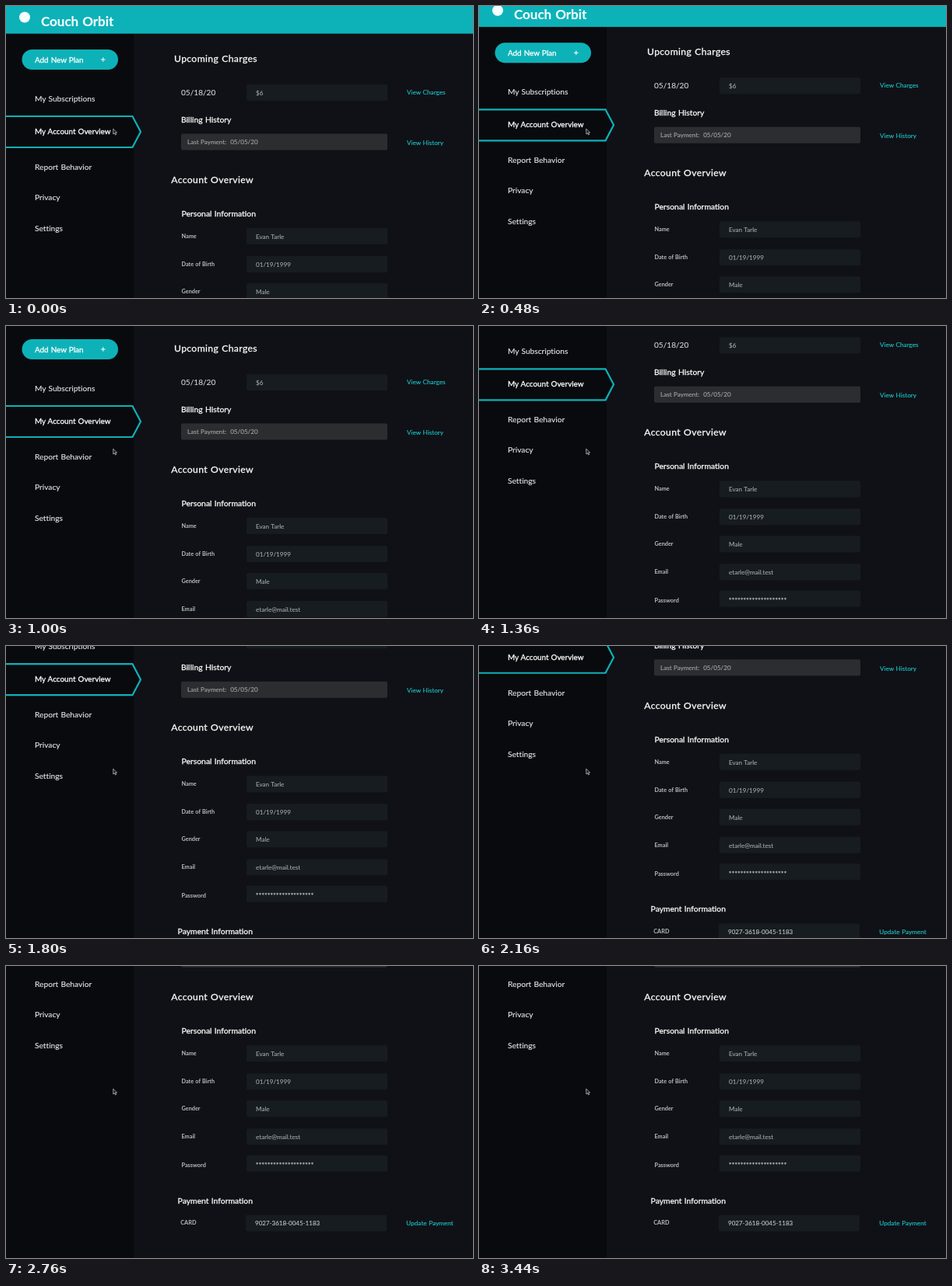
These frames come from a looping animation (600 px wide and 376 px high, 3520 ms). An HTML page:

```html
<!DOCTYPE html>
<html lang="en">
<head>
<meta charset="utf-8">
<title>Account overview</title>
<style>
  html, body { margin: 0; width: 100%; height: 100%; overflow: hidden; background: #101116; }
  svg { display: block; }
  text {
    font: 8.1px Lato, "Open Sans", sans-serif; font-variant-ligatures: none;
    white-space: pre; word-spacing: .05em;
    color: #a3a5a8; fill: currentColor; stroke: currentColor; stroke-width: .12px;
  }
  .brand { font-size: 17px; font-weight: 700; color: #f4ffff; }
  .nav { font-size: 10.2px; color: #e8e9ea; }
  .active { font-size: 9.9px; color: #fff; stroke-width: .3px; }
  .title { font-size: 12.2px; letter-spacing: .35px; color: #fafafa; stroke-width: .3px; }
  .sub { font-size: 10.4px; color: #fafafa; stroke-width: .3px; }
  .date { font-size: 10.1px; color: #d2d3d5; }
  .label { font-size: 7.3px; font-weight: 700; color: #b9bbbe; stroke: none; }
  .card { font-size: 8px; color: #c3c5c7; }
  .link { font-size: 8.2px; color: #1ab8bd; stroke-width: .2px; }
  .secret { letter-spacing: .28px; stroke-width: .35px; }
</style>
</head>
<body>
<svg width="600" height="376" viewBox="0 0 600 376">
  <rect width="600" height="376" fill="#101116"/>
  <rect width="164" height="376" fill="#090a0e"/>
  <g id="page"></g>
  <path d="M137.8 158.2v6.7l1.6-1.4 1.1 2.5 1.1-.5-1.1-2.4h2.1z" fill="#111" stroke="#d8d8d8" stroke-width=".7"/>
</svg>
<script>
const TEAL = '#0db2b8';
const LOOP = 3520, STEP = 40;
const page = document.getElementById('page');

function add(tag, attrs, content = '') {
  const node = document.createElementNS('http://www.w3.org/2000/svg', tag);
  for (const name in attrs) node.setAttribute(name, attrs[name]);
  node.textContent = content;
  page.append(node);
}
const text = (kind, x, y, content) => add('text', { class: kind, x, y }, content);
const box = (x, y, width, height, fill, rx = 0) => add('rect', { x, y, width, height, fill, rx });
const field = (y, x = 309) => box(x, y, 181, 21, '#161c20', 2);

// Header and sidebar
box(0, 0, 600, 35.6, TEAL);
add('circle', { cx: 24, cy: 14.5, r: 7, fill: '#f4ffff' });
text('brand', 45, 25.5, 'Couch Orbit');
box(20.5, 56, 123.5, 26, TEAL, 13);
text('active', 37, 72.7, 'Add New Plan');
add('path', { d: 'M122 69h5.6M124.8 66.2v5.6', stroke: '#fff', 'stroke-width': 1 });
add('path', { d: 'M-4 142H162.500L173 162 162.500 182H-4', fill: '#090a0e', stroke: TEAL, 'stroke-width': 2.2 });
text('active', 37, 164.8, 'My Account Overview');
[['My Subscriptions', 122.9], ['Report Behavior', 210.8], ['Privacy', 250.2], ['Settings', 290.1]]
  .forEach(([name, y]) => text('nav', 37, y, name));

// Charges
text('title', 216, 71.5, 'Upcoming Charges');
text('date', 225, 114.8, '05/18/20');
field(101);
text('value', 321, 114.7, '$6');
text('link', 515, 114.1, 'View Charges');
text('sub', 225, 150, 'Billing History');
box(225, 164.5, 265, 21, '#2c2d31', 2);
text('value', 233, 178.2, 'Last Payment:  05/05/20');
text('link', 515, 179.2, 'View History');

// Personal and payment details
text('title', 212.3, 228.1, 'Account Overview');
text('sub', 225.5, 271, 'Personal Information');
[['Name', 'Evan Tarle', 286], ['Date of Birth', '01/19/1999', 322], ['Gender', 'Male', 357],
 ['Email', 'etarle@mail.test', 393]].forEach(([label, value, y]) => {
  field(y);
  text('label', 225.5, y + 13.1, label);
  text('value', 321, y + 14.1, value);
});
field(427.5);
text('label', 225.5, 443.1, 'Password');
text('value secret', 321, 443, '*'.repeat(20));
text('sub', 220.6, 489.4, 'Payment Information');
field(504.5, 308);
text('label', 224.3, 517.1, 'CARD');
text('card', 320, 517.9, '9027-3618-0045-1183');
text('link', 514.3, 517.9, 'Update Payment');

// Scroll flicks as [ms, offset], joined by a monotone cubic
const keys = [[160, 0], [480, 8.7], [840, 36.5], [1000, 39], [1120, 40], [1360, 86.7],
  [1800, 118.8], [1840, 119], [2440, 175.2], [2760, 183.7]];
const slope = i => (keys[i + 1][1] - keys[i][1]) / (keys[i + 1][0] - keys[i][0]);
const tangents = keys.map((_, i) => {
  if (i === 0 || i === keys.length - 1) return 0;
  const before = slope(i - 1), after = slope(i);
  return 2 * before * after / (before + after);
});

function scrollAt(time) {
  if (time <= keys[0][0]) return 0;
  const next = keys.findIndex(([ms]) => ms > time);
  if (next < 0) return keys.at(-1)[1];
  const i = next - 1, [t0, y0] = keys[i], [t1, y1] = keys[next];
  const span = t1 - t0, u = (time - t0) / span, v = 1 - u;
  return y0 * v * v * (1 + 2 * u) + y1 * u * u * (3 - 2 * u)
    + span * u * v * (tangents[i] * v - tangents[next] * u);
}

function draw() {
  const time = Math.floor(performance.now() % LOOP / STEP) * STEP;
  page.setAttribute('transform', `translate(0 ${-scrollAt(time).toFixed(2)})`);
  requestAnimationFrame(draw);
}
draw();
</script>
</body>
</html>
```
